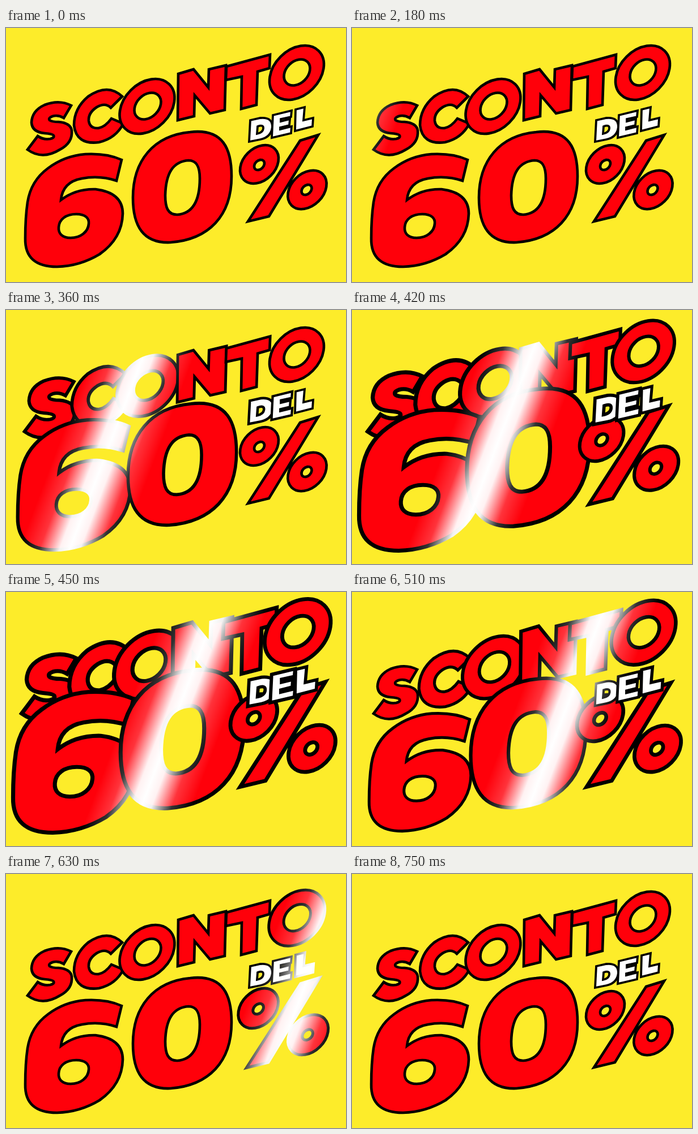
An HTML page with a canvas that plays this animation: 600x449 px, repeating every 0.9 s.

```html
<!DOCTYPE html>
<html lang="it">
<head>
<meta charset="utf-8">
<title>Sconto del 60%</title>
<style>
html, body { margin: 0; width: 100%; height: 100%; overflow: hidden; background: #fdec2a; }
canvas { display: block; }
</style>
</head>
<body>
<canvas id="stage" width="600" height="449" role="img" aria-label="SCONTO DEL 60%"></canvas>
<script>
const ctx = document.getElementById('stage').getContext('2d');
const LOOP = 900, STEP = 30, RISE = 105, GROWTH = 0.25;
const RED = { fill: '#ff000a', line: 4.6 }, WHITE = { fill: '#fff', line: 3.8 };

// Ellipse leaning up to the right, r = half of its bounding box
function ring(cx, cy, r) {
  const a = r * 1.14, b = r * 0.835, d = a * Math.SQRT1_2;
  const arc = (x, y) => `A${a} ${b} -45 0 1 ${x} ${y}`;
  return `M${cx - d} ${cy + d}${arc(cx + d, cy - d)}${arc(cx - d, cy + d)}Z`;
}

// Scale origin x, y; start of growth; start and end of shrinking
const glyph = (d, x, y, grow, shrink, end, style = RED) =>
  ({ path: new Path2D(d), x, y, grow, shrink, end, style });

const glyphs = [
  // SCONTO
  glyph('M38 215L56 191Q66 198 78 196Q86 194 84 190Q82 187 68 186Q46 184 45 167Q46 146 68 136Q94 126 115 137L102 159Q92 153 82 156Q74 159 77 163Q81 166 93 166Q114 168 116 181Q118 203 95 215Q64 234 38 215Z',
    79, 216, 305, 450, 510),
  glyph('M205 121L185 141Q175 131 160 140Q145 150 146 164Q148 178 163 177Q175 175 186 160L207 169Q194 195 164 202Q124 207 120 172Q120 142 145 121Q180 97 205 121Z',
    153, 190, 312, 450, 528),
  glyph(ring(249, 138.5, 48.5) + ring(250, 138, 23.5), 240, 177, 312, 455, 580),
  glyph('M304 81L331 73L357 105L358 73L388 66L386 145L360 151L333 119L332 156L303 163Z',
    341, 154, 350, 465, 585),
  glyph('M389 68L466 47L465 71L444 77L442 136L415 143L416 86L388 92Z',
    412, 136, 358, 470, 605),
  glyph(ring(513, 79, 48) + ring(513.5, 78.5, 23), 505, 118, 360, 460, 655),
  // 60%
  glyph('M204 233L195 270Q165 260 134 266Q100 272 97 304Q123 284 158 285Q206 291 206 328Q205 372 165 400Q130 421 90 422Q33 422 34 372Q34 335 38 308Q44 270 74 248Q103 226 140 223Q178 221 204 233Z'
    + 'M93 352C94 338 106 329 124 329C141 329 147 337 146 346C145 360 132 371 114 371C99 371 92 363 93 352Z',
    120, 408, 295, 450, 523),
  glyph('M224 300C224 235 260 190 325 184C384 177 398 215 398 262C398 332 358 374 290 379C242 381 224 350 224 300Z'
    + 'M281 296C282 256 295 236 322 234C338 234 342 248 342 266C342 305 330 328 302 330C286 330 281 318 281 296Z',
    311, 366, 318, 470, 590),
  glyph(ring(447, 241, 34) + ring(447, 242, 9) + 'M519 199L551 189L464 333L427 342Z'
    + ring(531.5, 286, 34.2) + ring(530.5, 286, 9),
    492, 330, 360, 475, 660),
  // DEL
  glyph('M431 163L449 159Q470 157 470 175Q468 193 449 197L429 201Z'
    + 'M444 174Q455 170 454 178Q453 185 443 187Z', 440, 195, 325, 445, 520, WHITE),
  glyph('M471 154L504 146L503 157L485 161L485 165L501 161L500 172L484 176L484 179L504 174L503 186L469 194Z',
    480, 187, 340, 455, 570, WHITE),
  glyph('M511 144L527 140L525 163L542 159L541 174L510 182Z', 510, 178, 362, 470, 655, WHITE)
];

const glare = ctx.createLinearGradient(-90, 0, 90, 0);
[[0, 0], [0.2, 0.2], [0.4, 0.95], [0.5, 1], [0.6, 0.95], [0.8, 0.2], [1, 0]]
  .forEach(([at, alpha]) => glare.addColorStop(at, `rgba(255,255,255,${alpha})`));

const clamp = v => Math.max(0, Math.min(1, v));

function drawGlyph(g, t) {
  const up = clamp((t - g.grow) / RISE);
  const down = clamp((g.end - t) / (g.end - g.shrink));
  const scale = 1 + GROWTH * Math.min(up, down);
  ctx.save();
  ctx.translate(g.x, g.y);
  ctx.scale(scale, scale);
  ctx.translate(-g.x, -g.y);
  ctx.fillStyle = g.style.fill;
  ctx.lineWidth = g.style.line * scale; // outlines thicken faster than the letters
  ctx.fill(g.path, 'evenodd');
  ctx.stroke(g.path);
  ctx.restore();
}

// Slanted light that only falls on the lettering
function drawGlare(t) {
  if (t < 180 || t >= 750) return;
  ctx.save();
  ctx.globalCompositeOperation = 'source-atop';
  ctx.transform(1, 0, -0.38, 1, 1.22 * t - 166, 0);
  ctx.fillStyle = glare;
  ctx.fillRect(-90, 0, 180, 449);
  ctx.restore();
}

function frame() {
  const t = Math.floor(performance.now() % LOOP / STEP) * STEP;
  ctx.clearRect(0, 0, 600, 449);
  glyphs.forEach(g => drawGlyph(g, t));
  drawGlare(t);
  requestAnimationFrame(frame);
}
frame();
</script>
</body>
</html>
```
